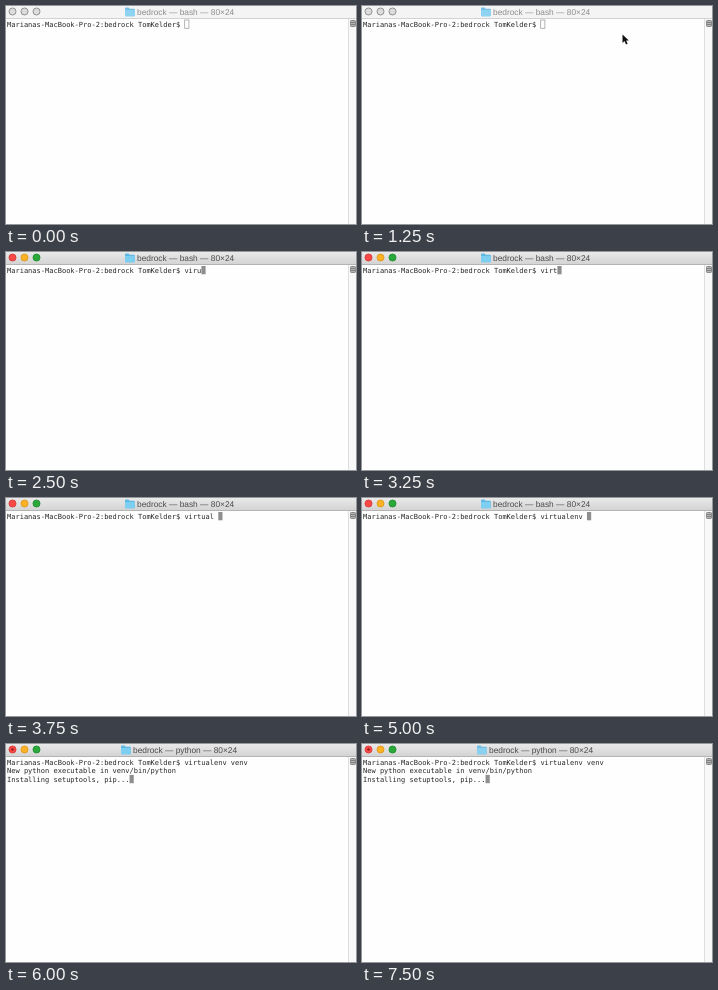
These frames come from a looping animation (350x218 px, 8 s). An HTML page:

```html
<!DOCTYPE html>
<html lang="en">
<head>
<meta charset="utf-8">
<title>Terminal</title>
<style>
  html, body { margin: 0; width: 100%; height: 100%; overflow: hidden; background: #fefefe; }
  svg { display: block; width: 100vw; height: 100vh; }
  text { text-rendering: geometricPrecision; white-space: pre; }
  .mono { font: 7.02px "DejaVu Sans Mono", monospace; fill: #262626; }
  .title { font: 8.35px "Liberation Sans", Arial, sans-serif; }
</style>
</head>
<body>
<svg viewBox="0 0 350 218" preserveAspectRatio="none">
  <defs>
    <linearGradient id="bar" x2="0" y2="1">
      <stop stop-color="#e9e9e9"/><stop offset="1" stop-color="#d4d4d4"/>
    </linearGradient>
  </defs>
  <rect width="350" height="218" fill="#fefefe"/>

  <rect x="342" y="12" width="8" height="206" fill="#f8f8f8"/>
  <path d="M342.5 12V218" stroke="#dedede"/>
  <rect x="344.5" y="14.5" width="5" height="6" rx=".8" fill="#b4b4b4" stroke="#777" stroke-width=".8"/>
  <path d="M345 16.5H349M345 18.5H349" stroke="#6c6c6c" stroke-width=".7"/>

  <rect id="head" width="350" height="12"/>
  <path id="edge" d="M0 12.5H350"/>
  <g id="lights" stroke-width=".9">
    <circle cx="6.5" cy="5.5" r="3.5"/>
    <circle cx="18.5" cy="5.5" r="3.5"/>
    <circle cx="30.5" cy="5.5" r="3.5"/>
  </g>
  <circle id="dot" cx="6.5" cy="5.5" r="1.2" fill="#8c1c16"/>

  <g id="label">
    <g id="folder">
      <path d="M-12 2.6Q-12 1.6 -11 1.6H-8.4L-7.4 2.7H-3Q-2.2 2.7 -2.2 3.5V9.4Q-2.2 10.2 -3 10.2H-11.2Q-12 10.2 -12 9.4Z" fill="#5fb9e3"/>
      <path d="M-12 4H-2.2V9.4Q-2.2 10.2 -3 10.2H-11.2Q-12 10.2 -12 9.4Z" fill="#7dcff2"/>
    </g>
    <text id="title" class="title" y="8.8"></text>
  </g>

  <rect id="caret" width="4.2" height="8.3"/>
  <g id="lines"></g>
  <path id="mouse" d="M0 0V8.4L2 6.6L3.5 10L5.1 9.3L3.7 6.1H6.3Z" fill="#111" stroke="#fff" stroke-width=".7" paint-order="stroke"/>
</svg>
<script>
const LOOP = 8000, LEFT = 1, ADVANCE = 4.226, ROW = 8.45;
const PROMPT = "Marianas-MacBook-Pro-2:bedrock TomKelder$ ";
const OUTPUT = ["New python executable in venv/bin/python", "Installing setuptools, pip..."];
const FOCUS = 1500, ENTER = 5750, RUN = 6000, FADE = 7500;

// [time, typed text, caret column when it runs ahead of the text]
const typing = [
  [0, ""], [2000, "v"], [2250, "vi"], [2500, "viru"], [2750, "virut"],
  [3000, "viru"], [3250, "virt"], [3500, "virtua"], [3750, "virtual", 8],
  [4250, "virtuale"], [4500, "virtualen"], [4750, "virtualenv"],
  [5000, "virtualenv "], [5250, "virtualenv v"], [5500, "virtualenv venv"]
];
// [time, x, y]; no position means hidden
const pointer = [
  [0], [500, 328, 51.5], [750, 270, 33.5], [1000, 269, 32.5],
  [1250, 260.5, 28.5], [1500, 249.3, 27.5], [1750]
];

const $ = id => document.getElementById(id);
const at = (steps, t) => steps.findLast(s => s[0] <= t);
const set = (el, attrs) => {
  for (const k in attrs) el.setAttribute(k, attrs[k]);
};
const show = (el, on) => set(el, { visibility: on ? "visible" : "hidden" });

const rows = [0, 1, 2].map(i => {
  const row = document.createElementNS("http://www.w3.org/2000/svg", "text");
  set(row, { class: "mono", x: LEFT, y: 20.6 + i * ROW });
  return $("lines").appendChild(row);
});
const lights = [...$("lights").children];
const lit = [["#fb4948", "#d93a38"], ["#fdb225", "#dd9a20"], ["#2ba83a", "#219030"]];

function drawWindow(t) {
  const active = t >= FOCUS, running = t >= RUN;
  set($("head"), { fill: active ? "url(#bar)" : "#f4f4f4" });
  set($("edge"), { stroke: active ? "#b4b4b4" : "#d2d2d2" });
  lights.forEach((c, i) => {
    const [fill, stroke] = active ? lit[i] : ["#dcdcdc", "#8a8a8a"];
    set(c, { fill, stroke });
  });
  show($("dot"), running);
  set($("label"), { transform: `translate(${running ? 127 : 131} 0)` });
  set($("folder"), { opacity: active && t < FADE ? 1 : 0.85 });
  set($("title"), { fill: active ? "#4a4a4a" : "#8c8c8c" });
  $("title").textContent = `bedrock — ${running ? "python" : "bash"} — 80×24`;
}

function drawShell(t) {
  const [, typed, ahead] = at(typing, t);
  const text = [PROMPT + typed, ...(t >= RUN ? OUTPUT : ["", ""])];
  rows.forEach((row, i) => { row.textContent = text[i]; });

  let line = 0, col = PROMPT.length + (ahead ?? typed.length);
  if (t >= RUN) [line, col] = [2, OUTPUT[1].length];
  else if (t >= ENTER) [line, col] = [1, 0];
  const active = t >= FOCUS;
  set($("caret"), {
    x: LEFT + col * ADVANCE + (active ? 0 : 0.2),
    y: 14 + line * ROW,
    fill: active ? "#8e8e8e" : "none",
    stroke: active ? "none" : "#a2a2a2",
    "stroke-width": 0.8
  });
}

function drawPointer(t) {
  const [, x, y] = at(pointer, t);
  show($("mouse"), x !== undefined);
  if (x !== undefined) set($("mouse"), { transform: `translate(${x} ${y})` });
}

const start = performance.now();
function frame() {
  const t = (performance.now() - start) % LOOP;
  drawWindow(t);
  drawShell(t);
  drawPointer(t);
  requestAnimationFrame(frame);
}
frame();
</script>
</body>
</html>
```
